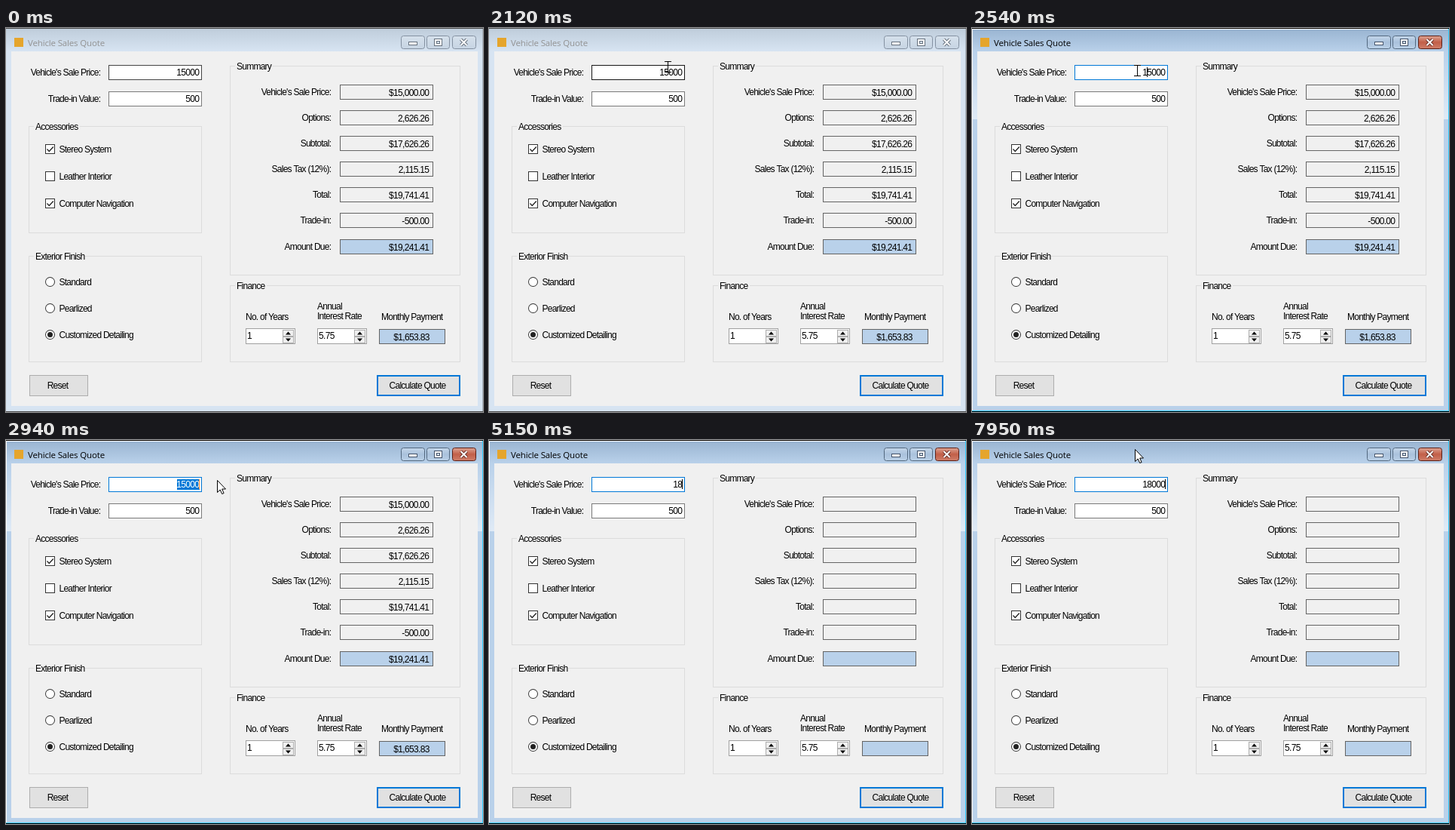
Recreate the animation shown at these times as an HTML page with a canvas. Size 633 by 509 pixels, loop 8000 ms.

```html
<!DOCTYPE html>
<html lang="en">
<head>
<meta charset="utf-8">
<title>Vehicle Sales Quote</title>
<style>
html, body { margin: 0; width: 100%; height: 100%; overflow: hidden; }
canvas { display: block; }
</style>
</head>
<body>
<canvas id="stage" width="633" height="509"></canvas>
<script>
const LOOP = 8000, FACE = '#f0f0f0', BLUE = '#b9d1ea', ACCENT = '#0078d7';
const g = document.getElementById('stage').getContext('2d');

// Cursor hot spot: time, x, y
const path = [
  [790, 527, 497], [930, 446, 377], [1070, 382, 283], [1210, 330, 210], [1350, 293, 158],
  [1560, 259, 99], [1770, 246, 70], [2120, 237, 51], [2400, 232, 48],
  [2540, 219, 56], [2670, 219, 56], [2740, 235, 56], [2810, 250, 56], [2940, 280, 53]
];
const typed = [[0, '15000'], [4550, '1'], [4680, '18'], [5880, '180'], [6010, '1800'], [6550, '18000']];
const caretToggles = [2400, 3490, 4020, 4550, 5150, 5680, 6550, 7080, 7610];
const summary = [
  [75, "Vehicle's Sale Price:", '$15,000.00'], [109, 'Options:', '2,626.26'],
  [143, 'Subtotal:', '$17,626.26'], [177, 'Sales Tax (12%):', '2,115.15'],
  [211, 'Total:', '$19,741.41'], [245, 'Trade-in:', '-500.00'],
  [280, 'Amount Due:', '$19,241.41']
];

function fill(x, y, w, h, color) {
  g.fillStyle = color;
  g.fillRect(x, y, w, h);
}

function box(x, y, w, h, color, border, line = 1) {
  fill(x, y, w, h, border);
  fill(x + line, y + line, w - 2 * line, h - 2 * line, color);
}

// Digits sit on a 6px pitch; words are set slightly tighter.
function text(str, x, y, align = 'left', color = '#000') {
  const spacing = /^[-$\d]/.test(str) ? -0.67 : -0.75;
  g.font = '12px "Liberation Sans", Arial, sans-serif';
  g.letterSpacing = spacing + 'px';
  g.textAlign = align;
  g.fillStyle = color;
  g.fillText(str, align === 'right' ? x + spacing : x, y);
}

function poly(points, color, stroke) {
  g.beginPath();
  points.forEach(([x, y]) => g.lineTo(x, y));
  g.closePath();
  g.fillStyle = color;
  g.fill();
  if (stroke) {
    g.strokeStyle = stroke;
    g.lineWidth = 1;
    g.stroke();
  }
}

function disc(x, y, r, color) {
  g.fillStyle = color;
  g.beginPath();
  g.arc(x, y, r, 0, 7);
  g.fill();
}

function gradient(y0, y1, ...colors) {
  const grad = g.createLinearGradient(0, y0, 0, y1);
  colors.forEach((c, i) => grad.addColorStop(i / (colors.length - 1), c));
  return grad;
}

function group(label, x, y, w, h, gap) {
  box(x, y, w, h, FACE, '#dcdcdc');
  fill(x + 7, y, gap, 1, FACE);
  text(label, x + 9, y + 5);
}

function checkBox(label, y, checked) {
  box(52, y, 13, 13, '#fff', '#333');
  if (checked) {
    g.strokeStyle = '#222';
    g.lineWidth = 1.3;
    g.beginPath();
    g.moveTo(54.5, y + 6.5);
    g.lineTo(57.3, y + 9.5);
    g.lineTo(62.8, y + 3.5);
    g.stroke();
  }
  text(label, 70.5, y + 11);
}

function radio(label, y, on) {
  disc(58.5, y - .5, 6.5, '#333');
  disc(58.5, y - .5, 5.5, '#fff');
  if (on) disc(58.5, y - .5, 3.5, '#222');
  text(label, 70.5, y + 4);
}

function spinner(value, x) {
  box(x, 398, 66, 21, '#fff', '#a0a0a0');
  for (const [y, dir] of [[400, -1], [409, 1]]) {
    box(x + 49, y, 15, 9, FACE, '#adadad');
    const cx = x + 56.5, cy = y + 4.5;
    poly([[cx - 3.5, cy - 2 * dir], [cx + 3.5, cy - 2 * dir], [cx, cy + 2 * dir]], '#000');
  }
  text(value, x + 2, 412);
}

function titleButton(x, w, active, close) {
  g.beginPath();
  g.roundRect(x + .5, 10.5, w - 1, 17, 3);
  g.fillStyle = !active ? gradient(10, 28, '#d6e1ec', '#c6d4e3')
    : close ? gradient(10, 28, '#dfa898', '#c25f48', '#d0806c')
    : gradient(10, 28, '#c6d8ea', '#a9c1dc', '#bcd2e8');
  g.fill();
  g.strokeStyle = !active ? '#8491a1' : close ? '#5b2018' : '#53687f';
  g.lineWidth = 1;
  g.stroke();
}

function drawWindow(active) {
  fill(0, 0, 633, 509, active ? BLUE : '#d7e4f2');
  fill(0, 1, 633, 30, active ? gradient(1, 31, '#99b4d1', '#b9d1ea') : gradient(1, 31, '#bfcddb', '#d7e4f2'));
  if (active) {
    fill(0, 31, 633, 90, gradient(31, 121, '#b9d1ea', '#dfeaf6'));
    fill(0, 1, 633, 1, '#fff');
    fill(0, 1, 1, 507, '#fff');
    fill(632, 1, 1, 507, '#35ceff');
    fill(0, 507, 633, 1, '#35ceff');
  } else {
    fill(632, 0, 1, 509, '#a9b4c0');
  }
  const edge = active ? '#000' : '#4c4c4c';
  fill(0, 0, 633, 1, edge);
  fill(0, 508, 633, 1, edge);
  fill(7, 31, 619, 470, FACE);

  fill(11, 13, 12, 12, '#e5a52c');
  g.font = '11.5px "Open Sans", "Noto Sans", sans-serif';
  g.letterSpacing = '-0.15px';
  g.textAlign = 'left';
  g.fillStyle = active ? '#000' : '#929292';
  g.fillText('Vehicle Sales Quote', 29, 24);

  titleButton(524, 32, active);
  titleButton(558, 31, active);
  titleButton(592, 32, active, true);
  const ink = active ? '#44536a' : '#66717e';
  box(534, 18, 12, 5, '#fff', ink);
  box(568, 14, 11, 10, '#fff', ink);
  box(571, 17, 5, 4, '#d5e1ee', ink);
  for (const [width, color] of [[4, active ? '#6a3028' : ink], [2, '#fff']]) {
    g.strokeStyle = color;
    g.lineWidth = width;
    g.beginPath();
    for (const s of [-1, 1]) {
      g.moveTo(607.5 - 4 * s, 15);
      g.lineTo(607.5 + 4 * s, 23);
    }
    g.stroke();
  }
}

function drawForm(filled) {
  text("Vehicle's Sale Price:", 126, 63, 'right');
  text('Trade-in Value:', 126, 98, 'right');
  box(136, 84, 124, 20, '#fff', '#7a7a7a');
  text('500', 257, 98, 'right');

  group('Accessories', 30, 130, 230, 142, 61);
  checkBox('Stereo System', 154, true);
  checkBox('Leather Interior', 190, false);
  checkBox('Computer Navigation', 226, true);

  group('Exterior Finish', 30, 302, 230, 141, 68);
  radio('Standard', 337);
  radio('Pearlized', 372);
  radio('Customized Detailing', 407, true);

  group('Summary', 297, 50, 306, 278, 47);
  summary.forEach(([y, label, value], i) => {
    text(label, 432, y + 14, 'right');
    box(443, y, 124, 20, i === 6 ? BLUE : FACE, '#646464');
    if (filled) text(value, 562, y + 15, 'right');
  });

  group('Finance', 297, 341, 306, 102, 42);
  text('No. of Years', 318, 387);
  text('Annual', 413, 373);
  text('Interest Rate', 413, 386);
  text('Monthly Payment', 498, 387);
  spinner('1', 318);
  spinner('5.75', 413);
  box(495, 399, 88, 20, BLUE, '#646464');
  if (filled) text('$1,653.83', 538, 414, 'center');

  box(31, 460, 78, 28, '#e1e1e1', '#adadad');
  text('Reset', 68.5, 478, 'center');
  box(492, 460, 111, 28, '#e1e1e1', ACCENT, 2);
  text('Calculate Quote', 546, 478, 'center');
}

function cursorAt(t) {
  if (t >= 7810) {
    const k = Math.min(2, Math.floor((t - 7810) / 70)) / 2;
    return [Math.round(279 - 63 * k), Math.round(51 - 39 * k)];
  }
  if (t < 790 || t >= 4550) return null;
  const end = path[path.length - 1];
  if (t >= end[0]) return end.slice(1);
  const start = t < 2670 ? 790 : 2670;
  const step = start + Math.floor((t - start) / 70) * 70;
  const i = path.findIndex(p => p[0] > step);
  const [t0, x0, y0] = path[i - 1], [t1, x1, y1] = path[i];
  const k = (step - t0) / (t1 - t0);
  return [Math.round(x0 + (x1 - x0) * k), Math.round(y0 + (y1 - y0) * k)];
}

function drawPrice(t, cursor, beam) {
  const active = t >= 2400;
  const border = active ? ACCENT : t < 70 ? '#444' : beam ? '#171717' : '#7a7a7a';
  box(136, 49, 124, 20, '#fff', border);
  const value = typed.filter(k => k[0] <= t).pop()[1];
  text(value, 257, 63, 'right');

  const dragging = t >= 2670 && t < 4550;
  const selected = dragging ? Math.max(0, Math.min(5, Math.round((cursor[0] - 227) / 6))) : 0;
  if (selected) {
    g.save();
    g.beginPath();
    g.rect(227, 52, 6 * selected, 14);
    g.clip();
    fill(227, 52, 30, 14, ACCENT);
    text(value, 257, 63, 'right', '#fff');
    g.restore();
  }
  if (caretToggles.filter(k => k <= t).length % 2) {
    const index = t < 2670 ? 1 : dragging ? selected : 5;
    fill(226 + 6 * index, 52, 1, 13, selected ? '#ff8728' : '#000');
  }
}

function drawCursor([x, y], beam) {
  if (beam) {
    fill(x, y - 7, 1, 15, '#000');
    for (const dy of [-7, 7]) {
      fill(x - 4, y + dy, 4, 1, '#000');
      fill(x + 1, y + dy, 4, 1, '#000');
    }
    return;
  }
  const arrow = [[0, 0], [0, 16], [3.7, 12.5], [6.2, 18], [8.6, 17], [6.2, 11.5], [11, 11.5]];
  poly(arrow.map(([dx, dy]) => [x + dx + .5, y + dy + .5]), '#fff', '#000');
}

function frame(now) {
  const t = now % LOOP;
  const cursor = cursorAt(t);
  const beam = cursor && t < 2940 && cursor[1] < 69;
  drawWindow(t >= 2400);
  drawForm(t < 4550);
  drawPrice(t, cursor, beam);
  if (cursor) drawCursor(cursor, beam);
  requestAnimationFrame(frame);
}
requestAnimationFrame(frame);
</script>
</body>
</html>
```
